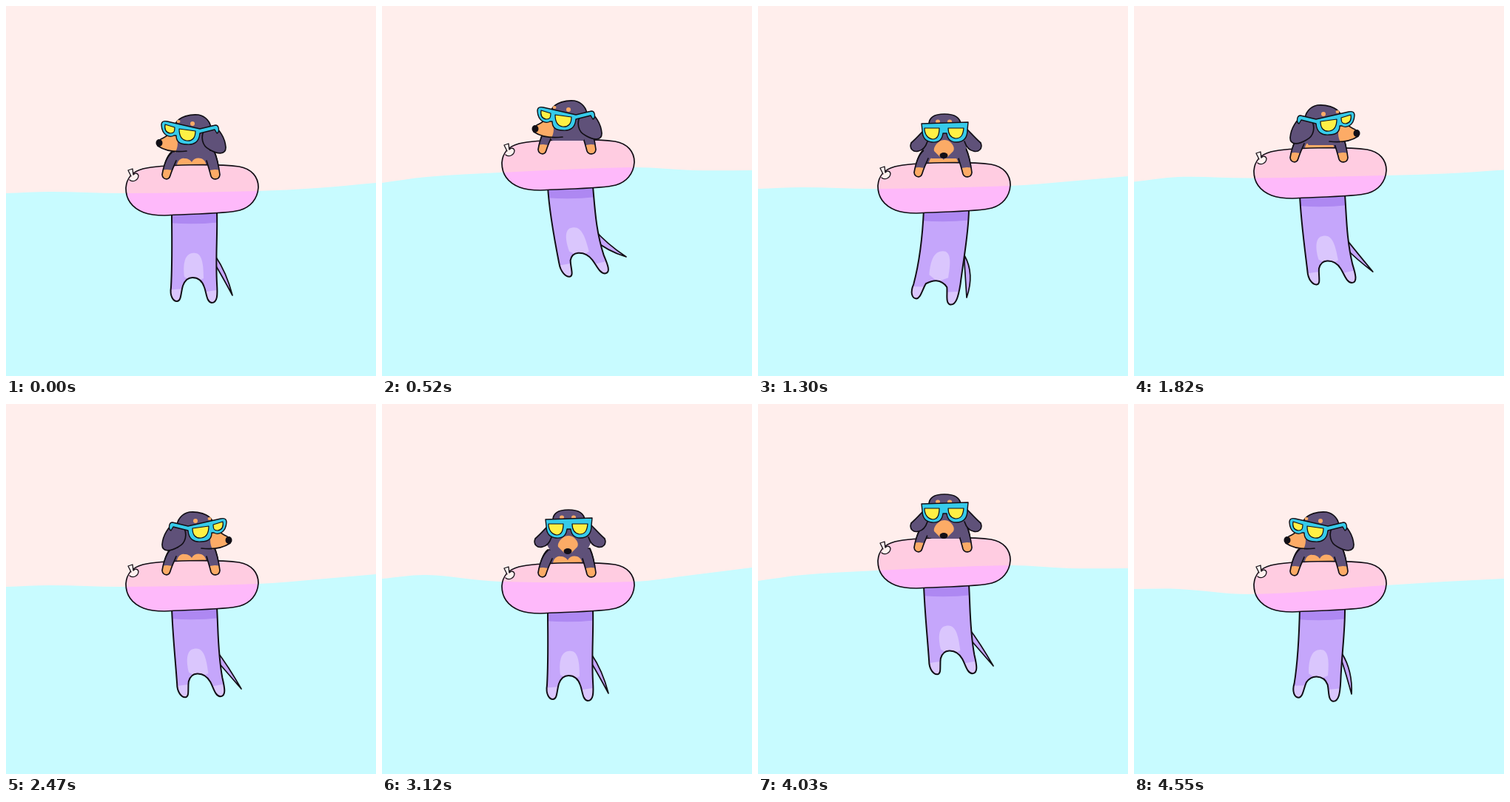
Recreate the animation shown at these times as an HTML page with a canvas. Size 500 by 500 pixels, loop 4.68 s.

```html
<!DOCTYPE html>
<html lang="en">
<head>
<meta charset="utf-8">
<title>Floating dachshund</title>
<style>
html, body { margin: 0; width: 100%; height: 100%; overflow: hidden; background: #ffeeec; }
canvas { display: block; width: 500px; height: 500px; }
</style>
</head>
<body>
<canvas id="stage" width="500" height="500"></canvas>
<script>
const ctx = document.getElementById('stage').getContext('2d');
const STEP = 130, FRAMES = 36;
const INK = '#120f16', COAT = '#5f5179', TAN = '#fcab66', CYAN = '#36cbea', YELLOW = '#fff044';
const VIOLET = '#c5a6fb', SHADE = '#ae88f2', PALE = '#dac6fd';

// Float height, head height above the float (9-step bob) and leg swing (12-step)
const bob = [215, 212, 200, 187, 181, 192, 215, 224, 213];
const neck = [68, 66, 63, 57, 53, 58, 66, 68, 67];
const swing = [0, .8, 1.4, 1.8, 2, 1.9, 1.5, 1, 0, -1, -2, -1];

// Water level at waveX for the key steps of the bob
const waveX = [0, 60, 160, 340, 420, 500];
const waveKeys = [
  [0, [253, 251, 253, 250, 246, 239]],
  [1, [247, 245, 247, 243, 237, 230]],
  [4, [239, 231, 225, 218, 222, 222]],
  [6, [236, 231, 240, 240, 231, 221]],
  [8, [250, 250, 257, 245, 240, 236]],
];

function draw(d, fill, stroke = INK, width = 1.7) {
  const path = new Path2D(d);
  if (fill) { ctx.fillStyle = fill; ctx.fill(path); }
  if (stroke) { ctx.strokeStyle = stroke; ctx.lineWidth = width; ctx.stroke(path); }
}
const spot = (x, y, rx, ry, fill) =>
  draw(`M${x - rx},${y} a${rx},${ry} 0 1 0 ${2 * rx},0 a${rx},${ry} 0 1 0 ${-2 * rx},0`, fill, null);

function group(dx, dy, paint) {
  ctx.save();
  ctx.translate(dx, dy);
  paint();
  ctx.restore();
}
function inside(d, paint) {
  ctx.save();
  ctx.clip(new Path2D(d));
  paint();
  ctx.restore();
}
function mirrored(paint) {
  ctx.save();
  ctx.transform(-1, 0, 0, 1, 508, 0);
  paint();
  ctx.restore();
}

function waterPath(phase) {
  let i = waveKeys.length - 1;
  while (waveKeys[i][0] > phase) i--;
  const [a, from] = waveKeys[i], [b, to] = waveKeys[i + 1] || waveKeys[0];
  const k = (phase - a) / ((b || 9) - a);
  const y = from.map((v, j) => v + (to[j] - v) * k);
  const slope = n => {
    const l = Math.max(0, n - 1), r = Math.min(5, n + 1);
    return (y[r] - y[l]) / (waveX[r] - waveX[l]);
  };
  let d = `M0,${y[0]}`;
  for (let j = 1; j < y.length; j++) {
    const x0 = waveX[j - 1], x1 = waveX[j], third = (x1 - x0) / 3;
    d += ` C${x0 + third},${y[j - 1] + slope(j - 1) * third} ${x1 - third},${y[j] - slope(j) * third} ${x1},${y[j]}`;
  }
  return d + ' L500,500 L0,500Z';
}

function legs(s) {
  const bend = d => d.replace(/([\d.]+),([\d.]+)/g, (_, x, y) => {
    const u = Math.max(0, (y - 275) / 125) ** 2;
    return `${+x + s * (s < 0 ? 9 : 11.5) * u},${+y - u * s * (x - 236) * .065}`;
  });
  const root = 283 + 2 * s, tip = `${306 + 12 * s},${391 - 3 * s - Math.max(0, s - 1) * 12}`;
  draw(`M${root},${338 - s} Q${298 + 2.5 * s},${360 - 2.5 * s} ${tip} Q${292 + 6 * s},365 ${root},350Z`, VIOLET);
  const crotch = 367 + 2 * Math.abs(s) - s;
  const body = bend('M224,278 C224,310 225,345 223,380 C221,392 226,399 231,399 C237,399 236,388 239,378 ' +
    `C242,${crotch + 3} 247,${crotch} 252,${crotch} C259,${crotch} 265,${crotch + 4} 268,380 ` +
    'C271,388 271,400 278,401 C286,401 286,390 285,375 C283,340 286,310 285,278Z');
  draw(body, VIOLET, null);
  inside(body, () => {
    draw('M220,276 H290 V292 Q255,296 220,293Z', SHADE, null);
    draw(bend('M241,366 C239,350 241,335 252,334 C264,332 267,345 267,368 L254,374Z'), PALE, null);
    draw(bend('M215,384 L240,382 L240,405 L215,405Z M264,387 L292,383 L292,410 L264,410Z'), PALE, null);
  });
  draw(body, null, INK, 2);
}

function chest() {
  draw('M224,197 C217,203 213,216 213,225 H288 C287,214 285,204 281,195Z', COAT);
  draw('M231,219 C230,210 236,205 241,206 C246,206 249,208 251,211 C254,205 262,204 267,208 C271,211 271,219 270,219Z', TAN, null);
}

const ring = 'M162,246 C163,232 170,224 185,220 C210,214 285,213 315,217 C332,220 341,231 341,245 ' +
  'C340,261 330,272 316,276 C298,281 245,281 214,283 C204,283 194,282 186,279 C171,273 162,262 162,246Z';
function float(water, dy) {
  draw(ring, '#ffcce1', null);
  inside(ring, () => group(0, -dy, () => draw(water, '#feb9fa', null)));
  draw(ring);
  draw('M167,235 C172,239 179,235 179,229 C178,226 175,225 172,228 L171,220 L165,222 L169,230', '#fff2ef', INK, 1.3);
}

function arms() {
  const left = 'M224,198 C217,204 213,216 211,228 C212,235 220,236 222,229 C224,222 227,216 230,209';
  const right = 'M281,196 C285,205 288,220 289,228 C288,236 279,235 277,230 C275,222 273,216 271,209';
  for (const arm of [left, right]) {
    draw(arm, COAT, null);
    inside(arm, () => draw('M205,224 Q218,218 229,224 V240 H205Z M271,224 Q282,218 294,224 V240 H271Z', TAN, null));
    draw(arm);
  }
}

function sideHead() {
  const head = 'M229,159 C234,149 250,146 260,147 C270,149 277,157 277,167 C279,182 278,194 272,201 ' +
    'L230,201 L228,197 C220,196 212,194 205,188 C203,184 206,181 209,180 C217,175 222,170 225,165Z';
  draw(head, COAT, null);
  inside(head, () => draw('M202,193 L203,180 L221,166 C231,172 236,186 228,199Z', TAN, null));
  draw('M277,167 C277,157 270,149 260,147 C250,146 234,149 229,159 ' +
    'M225,169 C219,175 214,178 209,180 M205,189 C214,195 228,198 244,196');
  spot(233, 156, 2.5, 2, TAN);
  spot(252, 159, 3, 3, TAN);
  spot(207, 185, 4.5, 5, INK);
  draw('M269,165 C262,177 265,189 275,194 C285,200 297,202 297,191 C296,178 288,166 280,162Z', COAT);
  draw('M210,161 C210,156 213,155 218,156 L262,166 L283,161 C288,161 289,170 285,172 L282,167 L262,172 ' +
    'C261,184 254,188 244,187 C234,187 230,182 230,175 L227,175 C222,178 211,176 210,161Z', CYAN, INK, 1.4);
  draw('M234,166 L256,169 C256,178 252,183 244,182 C237,181 234,175 234,166Z ' +
    'M215,160 L228,164 C228,170 227,172 222,172 C216,171 214,166 215,160Z', YELLOW, INK, 1.2);
}

function frontHead() {
  draw('M231,160 C231,150 241,147 252,147 C264,147 273,150 274,160 L284,184 C282,196 276,204 270,207 H235 C228,204 222,196 220,184Z', COAT, null);
  draw('M231,161 C231,150 241,147 252,147 C264,147 273,150 274,161');
  const ear = () => draw('M226,167 C219,174 214,180 207,186 C204,194 210,199 217,197 C223,196 227,190 229,184', COAT);
  ear();
  mirrored(ear);
  spot(243, 157, 3, 2.5, TAN);
  spot(259, 157, 3, 2.5, TAN);
  draw('M244,185 C248,181 256,181 260,185 C264,189 266,193 264,197 L256,205 L246,205 L238,197 C237,193 240,188 244,185Z', TAN, null);
  spot(251, 203, 5.5, 4, INK);
  draw('M221,160 L284,158 L283,168 C283,179 278,185 268,185 C260,185 256,181 255,173 L250,173 ' +
    'C249,181 245,186 235,185 C226,184 222,179 222,169Z', CYAN, INK, 1.4);
  draw('M225,166 L245,166 C245,176 242,181 236,181 C229,180 225,174 225,166Z ' +
    'M257,166 L278,166 C277,176 274,180 267,180 C260,179 257,173 257,166Z', YELLOW, INK, 1.2);
}

function head(n) {
  if (n < 9 || n > 32) sideHead();
  else if (n > 12 && n < 22) mirrored(sideHead);
  else frontHead();
}

function render(n) {
  const phase = n % 9, dy = bob[phase] - 215;
  const lift = n === 22 ? 14 : n > 21 && n < 33 ? 6 : 0;
  const water = waterPath(phase);
  ctx.fillStyle = '#ffeeec';
  ctx.fillRect(0, 0, 500, 500);
  draw(water, '#c8fbff', null);
  group(0, dy, () => {
    legs(swing[n % 12]);
    chest();
    float(water, dy);
    arms();
  });
  group(0, bob[phase] - neck[phase] - lift - 147, () => head(n));
}

ctx.lineJoin = ctx.lineCap = 'round';
function tick() {
  render(Math.floor(performance.now() / STEP) % FRAMES);
  requestAnimationFrame(tick);
}
tick();
</script>
</body>
</html>
```
